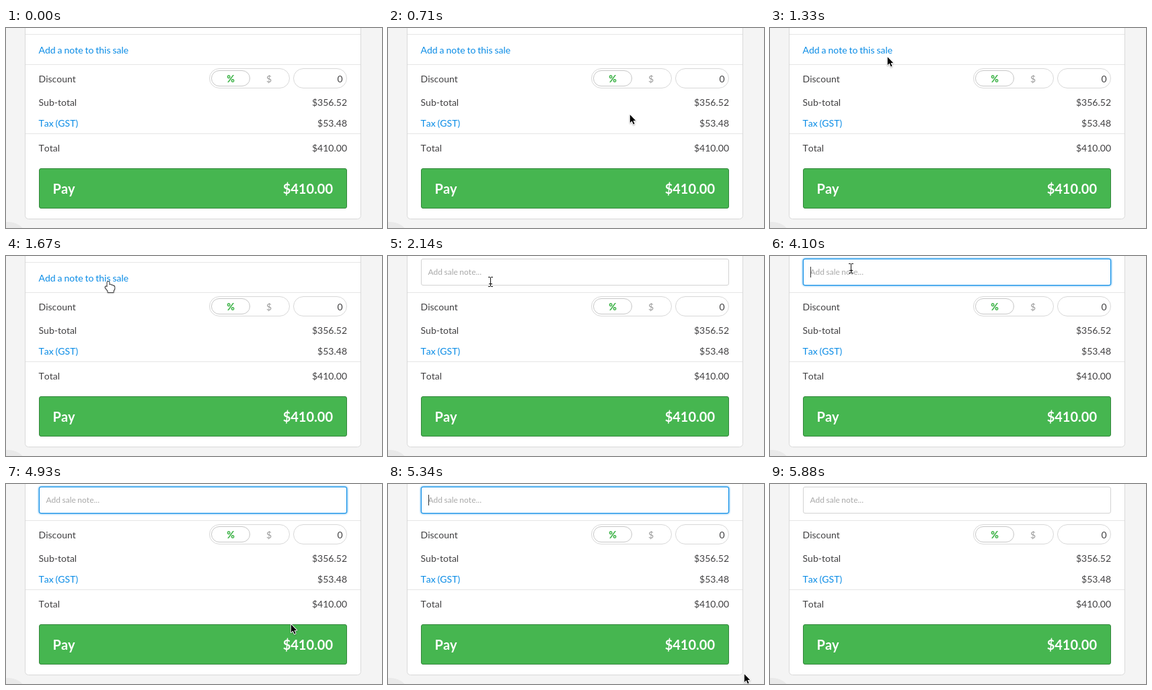
Animation, 559 px wide and 298 px high, one loop 5.98 s. Source, as an HTML page with a canvas:

```html
<!DOCTYPE html>
<html lang="en">
<head>
<meta charset="utf-8">
<title>Sale summary</title>
<style>
html, body { margin: 0; width: 100%; height: 100%; overflow: hidden; background: #f4f4f4; }
canvas { display: block; }
</style>
</head>
<body>
<canvas id="stage" width="559" height="298"></canvas>
<script>
const ctx = document.getElementById('stage').getContext('2d');
const LOOP = 5980;
const NOTE_OPEN = 2140, FOCUS = 3140, BLUR = 5880, BLINK = 480;
const INK = '#414042', BLUE = '#0a8ce6', GREEN = '#46b650', RULE = '#e6e6e6';

// Pointer legs: first and last step time, step count, stops as [progress, x, y].
const legs = [
  { start: 420, end: 880, steps: 9, enter: true, stops: [[0, 541, 243], [0.625, 359, 128], [1, 293, 99]] },
  { start: 1110, end: 1670, steps: 11, stops: [[0, 293, 99], [5 / 11, 174, 42], [1, 152, 38]] },
  { start: 2620, end: 2850, steps: 5, stops: [[0, 152, 38], [1, 120, 18]] },
  { start: 4400, end: 4700, steps: 6, stops: [[0, 120, 18], [0.5, 270, 105], [1, 394, 200]] },
  { start: 4930, end: 5110, steps: 4, stops: [[0, 394, 200], [0.25, 423, 208], [1, 531, 275]] },
  { start: 5280, end: 5580, steps: 5, stops: [[0, 531, 275], [1, 522, 302]] }
];

function pointerAt(t) {
  const leg = legs.filter(l => t >= l.start).pop();
  if (!leg) return null;
  const gap = (leg.end - leg.start) / (leg.steps - 1);
  const step = Math.min(leg.steps - 1, Math.floor((t - leg.start) / gap + 0.15));
  const u = leg.enter ? step / (leg.steps - 1) : (step + 1) / leg.steps;
  const s = leg.stops;
  let i = 0;
  while (i < s.length - 2 && u > s[i + 1][0] + 1e-6) i++;
  const [u0, x0, y0] = s[i], [u1, x1, y1] = s[i + 1];
  let k = (u - u0) / (u1 - u0);
  if (i === s.length - 2) k = 1 - Math.pow(1 - k, 1.3);
  return { x: Math.round(x0 + (x1 - x0) * k), y: Math.round(y0 + (y1 - y0) * k) };
}

function text(str, x, y, { size = 14, color = INK, weight = 400, align = 'left' } = {}) {
  ctx.font = `${weight} ${size}px Lato, sans-serif`;
  ctx.fontKerning = 'none';
  ctx.wordSpacing = `${-0.05 * size}px`;
  ctx.textAlign = align;
  ctx.fillStyle = color;
  ctx.fillText(str, x, y);
}

function box(x, y, w, h, r, fill, stroke) {
  ctx.beginPath();
  ctx.roundRect(x + 0.5, y + 0.5, w - 1, h - 1, r);
  ctx.fillStyle = fill;
  ctx.fill();
  ctx.strokeStyle = stroke;
  ctx.lineWidth = 1;
  ctx.stroke();
}

function rect(x, y, w, h, color) {
  ctx.fillStyle = color;
  ctx.fillRect(x, y, w, h);
}

const rule = y => rect(29, y, 498, 1, RULE);

function row(label, value, y, color = INK) {
  text(label, 48.5, y, { color });
  text(value, 507, y, { align: 'right' });
}

function noteField(t) {
  const focused = t >= FOCUS && t < BLUR;
  ctx.save();
  if (focused) {
    ctx.shadowColor = BLUE;
    ctx.shadowBlur = 3;
  }
  box(49, 4, 458, 40, 2.5, '#fff', focused ? BLUE : '#d2d2d2');
  ctx.restore();
  if (focused) box(49, 4, 458, 40, 2.5, '#fff', BLUE);
  text('Add sale note...', 59.5, 28, { size: 12, color: '#a9a9a9' });
  if (focused && Math.floor((t - FOCUS) / BLINK) % 2 === 0) rect(60, 16, 1, 16, '#333');
}

function page(t) {
  rect(0, 0, 559, 298, '#f4f4f4');
  ctx.beginPath();
  ctx.arc(3, 320, 31, 0, Math.PI * 2);
  ctx.fillStyle = '#e9e9e9';
  ctx.fill();
  box(28, -20, 500, 305, 5, '#fff', '#d9d9d9');

  if (t < NOTE_OPEN) {
    rule(9);
    text('Add a note to this sale', 48.5, 38, { color: BLUE });
  } else {
    noteField(t);
  }
  rule(54);

  text('Discount', 48.5, 81);
  box(302, 60, 120, 30, 14.5, '#fff', '#d8d8d8');
  box(305, 63, 58, 24, 11.5, '#fff', '#c6c6c6');
  text('%', 334, 81, { weight: 900, color: GREEN, align: 'center' });
  text('$', 391, 81, { color: '#999', align: 'center' });
  box(427, 60, 80, 30, 14.5, '#fff', '#d8d8d8');
  text('0', 500.5, 81, { align: 'right' });

  row('Sub-total', '$356.52', 116);
  row('Tax (GST)', '$53.48', 147, BLUE);
  rule(157);
  row('Total', '$410.00', 184);

  box(49, 209, 458, 60, 2.5, GREEN, '#33863c');
  text('Pay', 69.5, 247, { size: 20, weight: 700, color: '#fff' });
  text('$410.00', 486, 247, { size: 20, weight: 700, color: '#fff', align: 'right' });
}

const arrow = new Path2D('M.8 1.2V13.2L3.6 10.6L5.8 15.6L7.6 14.8L5.5 9.9H9.2Z');
const hand = new Path2D('M-1.5 8V1.2Q-1.5 0 0 0T1.5 1.2V5Q3.8 4 4.4 5.6Q6.6 4.9 7.2 6.5' +
  'Q9.3 6 9.4 8V11L7.7 14V16H-.5V14L-4.3 9.3Q-4.8 7.6 -3.2 7.3Z');

function shape(path, fill, stroke, line) {
  ctx.save();
  ctx.shadowColor = 'rgba(0,0,0,0.3)';
  ctx.shadowBlur = 2;
  ctx.shadowOffsetY = 1;
  ctx.strokeStyle = stroke;
  ctx.lineWidth = line;
  ctx.lineJoin = 'round';
  ctx.stroke(path);
  ctx.restore();
  ctx.fillStyle = fill;
  ctx.fill(path);
}

function beam() {
  const bars = [[0, -6, 1, 13], [-3, -7, 3, 1], [1, -7, 3, 1], [-3, 7, 3, 1], [1, 7, 3, 1], [-2, 3, 5, 1]];
  for (const [x, y, w, h] of bars) rect(x, y, w, h, '#111');
}

function pointer(t) {
  const p = pointerAt(t);
  if (!p || p.y >= 298) return;
  ctx.save();
  ctx.translate(p.x, p.y);
  if (t >= NOTE_OPEN && p.y < 44) beam();
  else if (t < NOTE_OPEN && p.x < 182 && p.y < 42) shape(hand, '#fff', '#111', 1.6);
  else shape(arrow, '#000', '#fff', 1.8);
  ctx.restore();
}

const began = performance.now();
function frame() {
  const t = (performance.now() - began) % LOOP;
  page(t);
  pointer(t);
  requestAnimationFrame(frame);
}
frame();
</script>
</body>
</html>
```
